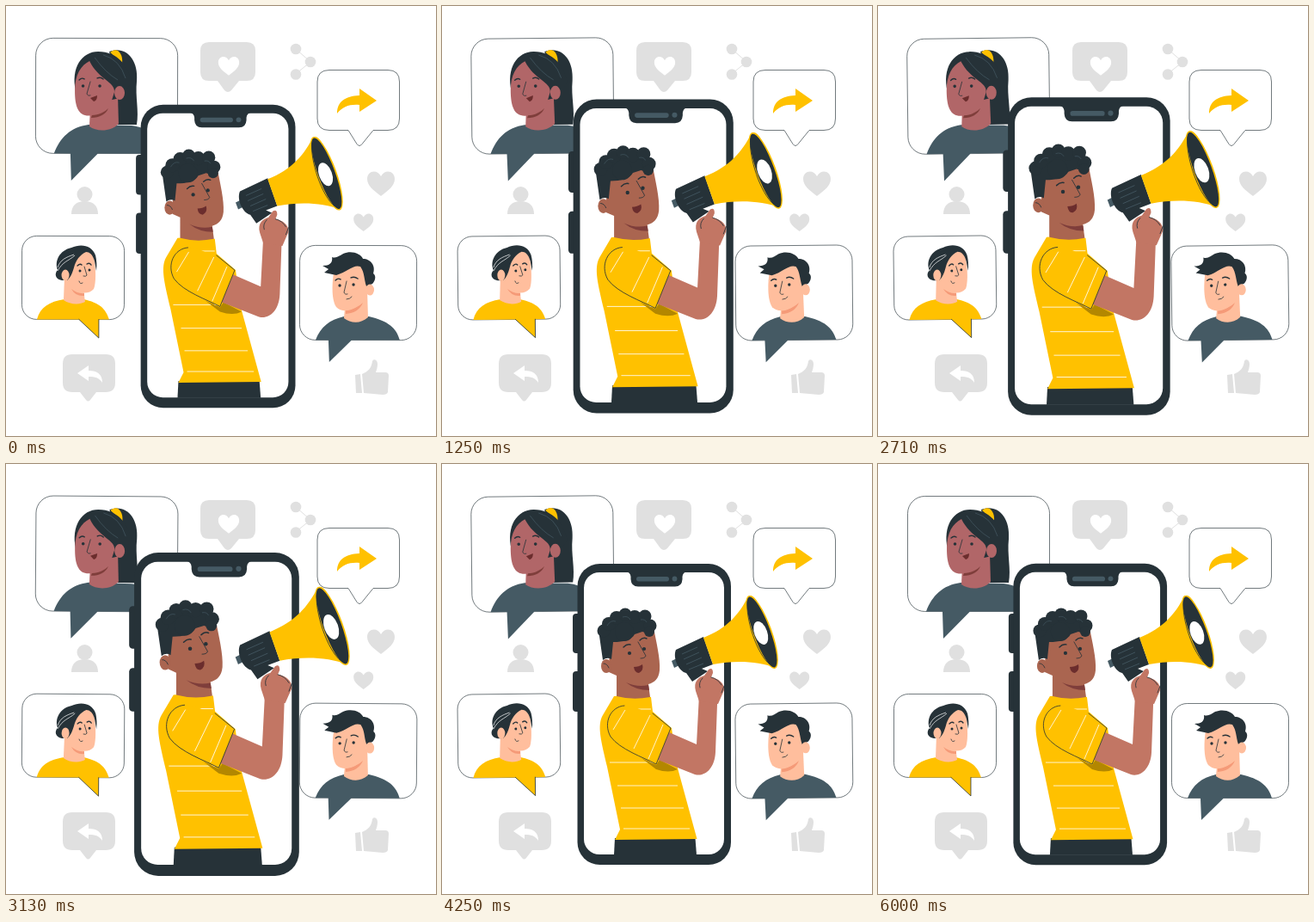
Recreate the animation shown at these times as an HTML page. Size 500x500 px, loop 6040 ms.

```html
<!DOCTYPE html>
<html lang="en">
<head>
<meta charset="utf-8">
<title>Megaphone in a phone</title>
<style>
  html, body { margin: 0; width: 100%; height: 100%; overflow: hidden; background: #fff; }
  svg { display: block; width: 100vw; height: 100vh; }
  .dark { fill: #263238; }
  .slate { fill: #455a64; }
  .yellow { fill: #ffc100; }
  .grey { fill: #e0e0e0; }
  .white { fill: #fff; }
  .rose { fill: #b16668; }
  .brown { fill: #aa6550; }
  .arm { fill: #c27664; }
  .pale { fill: #ffbe9d; }
  .line { fill: none; stroke: #263238; stroke-width: .8; stroke-linecap: round; stroke-linejoin: round; }
  .brow { stroke-width: 1.4; }
  .bubble { fill: #fff; stroke: #263238; stroke-width: .65; }
  .stripe { fill: none; stroke: #fff; stroke-width: .8; }
</style>
</head>
<body>
<svg viewBox="0 0 500 500">
  <defs>
    <path id="heart" d="M0 14C-9 7-16 2-16-6C-16-15-5-18 0-9C5-18 16-15 16-6C16 2 9 7 0 14Z"/>
  </defs>

  <!-- still icons -->
  <g class="grey">
    <path d="M236 42H280Q290 42 290 52V77Q290 87 280 87H271L262 98Q258 102 254 98L246 87H236Q226 87 226 77V52Q226 42 236 42Z"/>
    <circle cx="337" cy="50" r="6.3"/><circle cx="354" cy="65" r="6.3"/><circle cx="337" cy="79.500" r="6.3"/>
    <path d="M337 50L354 65L337 79" fill="none" stroke="#e0e0e0"/>
    <use href="#heart" x="436" y="207"/>
    <use href="#heart" transform="translate(415.700 252)scale(.72)"/>
    <circle cx="91.500" cy="219" r="9"/>
    <path d="M76 242C76 232 82 227 91.500 227S107 232 107 242Z"/>
    <path d="M77 405H116Q127 405 127 416V438Q127 449 116 449H105L98 458Q95.500 461 93 458L86 449H77Q66 449 66 438V416Q66 405 77 405Z"/>
    <path d="M406 429L412 428L414 450L407 450Z"/>
    <path d="M414 428C421 425 425 421 426 413C427 410 432 411 432 416C432 420 431 423 430 426H441Q445 426 445 430L444 449Q443 452 438 452L416 450Z"/>
  </g>
  <use href="#heart" class="white" transform="translate(259 70)scale(.76)"/>
  <path class="white" d="M83 427L96 418V424C106 424 112 428 112 438C108 432 104 431 96 431V436Z"/>
  <path class="bubble" d="M376 74.500H444Q457.500 74.500 457.500 88V131Q457.500 144.500 444 144.500H427L414 160.500Q411 164.500 408 160.500L398 144.500H376Q362 144.500 362 131V88Q362 74.500 376 74.500Z"/>
  <path class="yellow" d="M385 125C385 111 394 105 411 104V96L431 110L411 123V115C400 114 391 117 385 125Z"/>

  <!-- woman -->
  <g class="sway" data-origin="117 120">
    <rect class="bubble" x="34.500" y="37.500" width="165" height="134" rx="20"/>
    <path class="slate" d="M75 171.500L76 203L107 171.500H178C176 152 165 141 146 139L96 138C75 141 63 153 56 171.500Z"/>
    <path class="dark" d="M120 53C139 46 154 62 152 87C150 106 155 122 152 138H126V90Z"/>
    <path class="yellow" d="M121 54C128 47 136 54 135 66Z"/>
    <path class="rose" d="M98 118L130 104L131 137C121 147 105 146 97 140Z"/>
    <path class="dark" d="M81 99C75 72 88 53 107 53C130 53 142 70 146 88C142 98 136 96 132 107L115 111Z"/>
    <path class="rose" d="M97 64C87 69 80 80 80 98C80 117 84 128 97 127.500C108 127 117 121 121 116L126 100C127 88 108 86 97 64Z"/>
    <ellipse class="rose" cx="132" cy="101" rx="6" ry="8"/>
    <path d="M100 127C108 127 115 123 119 119C116 126 109 130 99 130Z" fill="#7f3e3b"/>
    <circle class="dark" cx="89.500" cy="93" r="1.800"/><circle class="dark" cx="109" cy="93" r="1.800"/>
    <path class="line" d="M98 88L94 102Q95 105 98 104"/>
    <path class="line brow" d="M85 86Q88 83 91 85M106 84Q110 82 113 85"/>
    <path d="M98 107L106 104Q106 110 102 111Z" fill="#6b2d2d"/>
    <path d="M113 57Q132 62 139 84M103 60Q116 78 130 86" fill="none" stroke="#455a64" stroke-width=".7"/>
  </g>

  <!-- man in yellow -->
  <g class="sway" data-origin="78 327">
    <rect class="bubble" x="18.500" y="267.500" width="119" height="97" rx="17"/>
    <path class="yellow" d="M36 364.500C40 350 50 344 68 341H90C109 345 116 352 120 364.500H108V386L85 364.500Z"/>
    <path class="line" d="M85 364.500L108 386V364.500"/>
    <path class="pale" d="M68 315L90 328L92 344C85 348 74 347 67 342Z"/>
    <path d="M76 329Q84 335 91 334V337Q81 338 76 329Z" fill="#f59a78"/>
    <path class="pale" d="M76 284H100C105 300 105 322 102 329C96 336 84 335 76 326L70 313Z"/>
    <path class="dark" d="M65 319C57 318 56 311 60 307C56 297 62 284 76 281C87 276 100 278 104 290Q106 298 105 308L103 297C101 289 97 286 93 286C86 289 81 296 79 304C77 311 75 316 71 319Z"/>
    <ellipse class="pale" cx="69" cy="313" rx="4.500" ry="6.500"/>
    <path d="M60 304C63 295 70 292 79 289M60 308C66 297 72 297 80 290" fill="none" stroke="#fff" stroke-width=".7"/>
    <circle class="dark" cx="86" cy="308" r="1.500"/><circle class="dark" cx="97" cy="307" r="1.500"/>
    <path class="line" d="M91 303L94 313Q93 315 90 314M85 320Q86 324 89 322"/>
    <path class="line brow" d="M83 302Q86 299 88 301M94 300Q97 298 99 301"/>
  </g>

  <!-- man in grey -->
  <g class="sway" data-origin="410 347">
    <rect class="bubble" x="341.500" y="278.500" width="136" height="110" rx="18"/>
    <path class="slate" d="M360 388.500C366 373 376 365 393 361H422C444 366 454 374 458 388.500H402L376 414L375 388.500Z"/>
    <path class="pale" d="M395 340L420 330L421 362C412 370 401 369 393 363Z"/>
    <path d="M395 354Q408 352 415 345Q410 357 395 358Z" fill="#f59a78"/>
    <path class="pale" d="M382 304C378 325 379 343 384 350C392 358 406 354 415 343L421 320L414 296Z"/>
    <path class="dark" d="M384 313L370 310L375 306L368 302C376 302 380 299 379 292C384 294 388 290 392 288C402 284 412 288 415 294C424 294 430 302 427 311C431 314 429 320 426 323L419 326C416 317 417 310 412 303C404 300 397 309 384 313Z"/>
    <ellipse class="pale" cx="423" cy="330" rx="5" ry="6.500"/>
    <circle class="dark" cx="388" cy="325" r="1.700"/><circle class="dark" cx="404" cy="324" r="1.700"/>
    <path class="line" d="M396 320L393 333Q394 336 397 335M396 341Q400 341 402 338"/>
    <path class="line brow" d="M383 319Q386 316 389 318M401 316Q405 314 409 317"/>
  </g>

  <!-- phone and speaker -->
  <g id="phone">
    <rect class="dark" x="152" y="174" width="12" height="46" rx="4"/>
    <rect class="dark" x="152" y="241" width="12" height="47" rx="4"/>
    <rect class="dark" x="157.500" y="116" width="178.500" height="350" rx="26"/>
    <rect class="white" x="165" y="126" width="163" height="328" rx="18"/>
    <path class="dark" d="M214 125Q219 126 219.500 131V134Q220 142.500 228 142.500H271Q279 142.500 279.500 134V131Q280 126 285 125Z"/>
    <rect class="slate" x="226" y="131" width="38" height="5.500" rx="2.700"/>
    <circle class="slate" cx="270.500" cy="133.500" r="2.900"/>

    <path class="dark" d="M201 435H294.500L296 454.500H200Z"/>
    <path class="yellow" d="M200 270Q221 268 243 271L245 288L267 307L273 350L296.500 436L201 437L207 425L192 352C185 322 180 304 187 292Z"/>
    <path class="stripe" d="M222 285H243M195 347H248M204 374H274M208 400H281M211 424H288"/>
    <path d="M232 342L249 350L253 344L274 355Q264 360 249 355Z" fill="#b38700"/>

    <path class="arm" d="M264 312L296 326L299 268L326 262L320 279L318 335C317 355 305 364 294 361L251 344Z"/>
    <path class="yellow" d="M212 281C196 282 187 301 196 317C207 332 234 341 249 349L266 307C248 296 229 280 212 281Z"/>
    <path class="line" d="M245 290L266 307L249 349C234 341 207 332 196 317C187 301 196 282 212 281"/>
    <path class="stripe" d="M213 286L199 309M242 292L223 331M257 303L240 343"/>

    <path class="brown" d="M195 200L246 190C249 207 254 226 253 240C252 250 247 254 240 256L242 271Q222 275 203 270L203 246L194 242Z"/>
    <path d="M214 254Q227 260 240 257L241 263Q225 263 214 254Z" fill="#7f3e3b"/>
    <ellipse class="brown" cx="191" cy="235" rx="6" ry="8"/>
    <path class="line" d="M188 232Q192 232 194 237"/>
    <path class="dark" d="M183 200L187 228Q192 224 197 227L199 207C211 207 220 205 224 198L233 195L245 199L239 176L205 176Z"/>
    <g class="dark">
      <circle cx="188" cy="194" r="7.500"/><circle cx="194" cy="186" r="8"/><circle cx="203" cy="179" r="8"/>
      <circle cx="213" cy="175" r="7.500"/><circle cx="224" cy="178" r="8"/><circle cx="236" cy="177" r="7.500"/>
      <circle cx="242" cy="188" r="7.500"/><circle cx="241" cy="195" r="6"/><circle cx="212" cy="195" r="11"/>
    </g>
    <path d="M192 188Q196 181 202 183M210 178Q216 176 219 181M231 181Q236 180 238 184" fill="none" stroke="#455a64" stroke-width=".6"/>
    <circle class="dark" cx="218" cy="220" r="2.100"/><circle class="dark" cx="235" cy="215" r="2.100"/>
    <path class="line" d="M228 207L237 223Q236 226 231 226"/>
    <path class="line brow" d="M211 213Q215 209 219 210M230 205Q234 201 238 203"/>
    <path d="M223 236Q229 236 233 233Q235 240 229 243Q224 243 223 236Z" fill="#6b2d2d"/>

    <path class="slate" d="M267 229L273 226L276 234L270 237Z"/>
    <path class="dark" d="M272 216L304 201L315 233L302 238L309 241L291 253L284 243C275 241 268 225 272 216Z"/>
    <path d="M279 221L297 213M281 227L299 219M284 233L302 225M287 239L304 232" stroke="#455a64" stroke-width=".8"/>
    <path class="yellow" d="M304 202C332 191 346 174 356 154Q361 150 368 162L389 237C366 229 341 228 315 233Z"/>
    <g transform="rotate(-20 372 195.500)">
      <ellipse class="yellow" cx="372" cy="195.500" rx="11.500" ry="45"/>
      <ellipse class="dark" cx="372" cy="195.500" rx="9.800" ry="43.500"/>
      <ellipse class="white" cx="370.500" cy="196" rx="7.500" ry="14"/>
    </g>
    <path class="line" d="M355 160C353 180 366 221 381 233"/>

    <path class="arm" d="M295 264C292 253 298 248 305 246L310 239Q315 236 315 243L313 248C321 249 329 255 328 263L321 279L299 276Z"/>
    <path class="line" d="M313 248Q321 250 325 257M328 258L325 266M303 249Q298 254 300 260"/>
  </g>
</svg>
<script>
  const LOOP = 6040, LEAD = 45;
  const beat = [[0, 1], [.1, 1.1], [.3, 1], [.4, 1], [.5, 1.1], [.6, 1], [1, 1]];
  const wind = [[0, 0], [.25, 1], [.75, -1], [1, 0]];
  const phone = document.getElementById('phone');
  const bubbles = document.querySelectorAll('.sway');

  // Linear interpolation between [position, value] keys.
  function tween(keys, p) {
    const i = keys.findIndex(key => key[0] > p);
    const [a, from] = keys[i - 1], [b, to] = keys[i];
    return from + (to - from) * (p - a) / (b - a);
  }

  function draw(now) {
    const p = (now + LEAD) / LOOP % 1;
    phone.setAttribute('transform', `translate(271 291)scale(${tween(beat, p)})translate(-271 -291)`);
    const angle = tween(wind, p * 4 % 1);
    for (const b of bubbles) b.setAttribute('transform', `rotate(${angle} ${b.dataset.origin})`);
  }

  const start = performance.now();
  function frame() {
    draw(performance.now() - start);
    requestAnimationFrame(frame);
  }
  frame();
</script>
</body>
</html>
```
